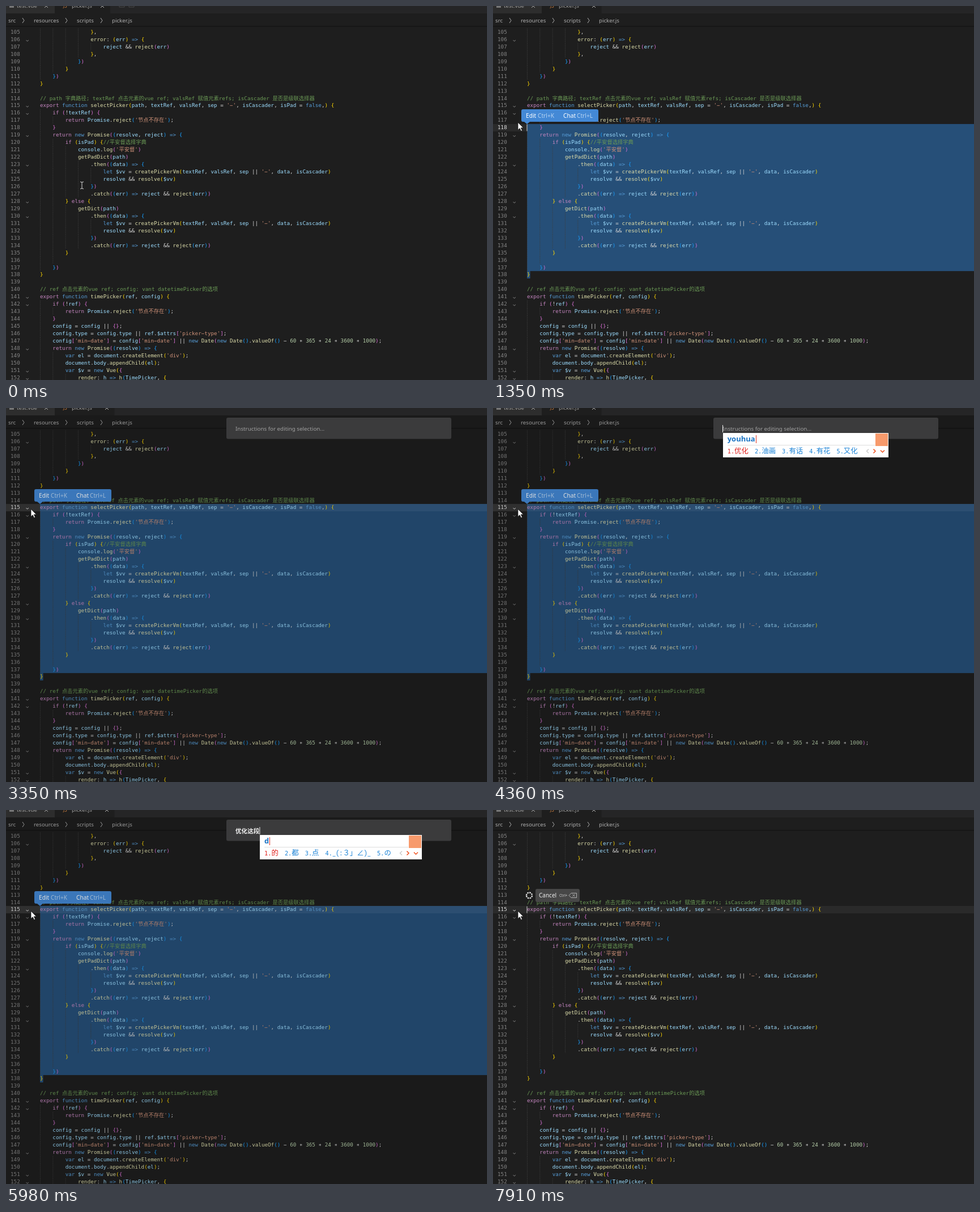
These frames come from a looping animation (849 px wide and 659 px high, 8 s). An HTML page:

```html
<!DOCTYPE html>
<html lang="zh-CN">
<head>
<meta charset="utf-8">
<title>Editor</title>
<style>
html, body { margin: 0; width: 849px; height: 659px; overflow: hidden; background: #1e1e1e; }
body { position: relative; }
svg { display: block; }
text { white-space: pre; }
.code { font: 9.27px "DejaVu Sans Mono", "Noto Sans CJK SC", monospace; }
.ui { font: 9.7px "Noto Sans", "Noto Sans CJK SC", sans-serif; }
#ime { position: absolute; top: 44px; height: 42.5px; box-sizing: border-box; padding: 0 54px 0 8px;
  background: #fff; white-space: nowrap; }
#pinyin { height: 21px; font: 600 13px/20px "Noto Sans", sans-serif; color: #1b74c4; }
#pinyin::after { content: ""; display: inline-block; width: 1px; height: 14px; margin-left: 1px;
  background: #e0301e; vertical-align: -3px; }
#cands { font: 12.4px/21px "Noto Sans Mono CJK SC", "Noto Sans CJK SC", sans-serif; color: #1a82d6; }
#cands span { margin-right: 11px; }
#cands span:first-child { color: #e0201c; }
#cands span:last-child { margin: 0; }
#cands i { font: 10.3px "DejaVu Sans Mono", monospace; }
#rule { position: absolute; left: 8px; right: 24px; top: 21px; height: 1px; background: #ddd; }
#badge { position: absolute; right: 1px; top: 1px; width: 22px; height: 22px; background: #f79a6c; }
#arrows { position: absolute; right: 0; top: 24px; }
</style>
</head>
<body>
<svg id="stage" width="849" height="659" viewBox="0 0 849 659">
  <rect width="849" height="659" fill="#1e1e1e"/>
  <rect id="rowGlow" width="849" height="13" fill="#2a2a2a"/>
  <g id="selection" fill="#264f78">
    <rect id="selMain" x="60" width="789"/>
    <rect id="selTail" x="60" width="5.6"/>
  </g>
  <g id="guides" stroke="#404040" stroke-width=".7" stroke-dasharray="2 1"></g>
  <g id="code" class="code"></g>
  <rect id="caret" width="1" height="12" fill="#d0d0d0"/>
  <rect y="35" width="849" height="1.5" fill="#151515"/>
  <rect width="849" height="13" fill="#252526"/>
  <rect width="86" height="13" fill="#2d2d2d"/>
  <rect id="tab" x="86" height="13" fill="#1e1e1e"/>
  <g class="ui" fill="#a0a0a0">
    <rect x="6" y="0" width="8" height="3" fill="#777"/>
    <text x="19" y="3">test.vue</text>
    <text x="101" y="3" fill="#d08040" font-size="8">JS</text>
    <text x="116" y="3">picker.js</text>
    <path d="M68 3L74-3M68-3L74 3" stroke="#aaa"/>
    <path id="tabClose" d="M-3 3L3-3M-3-3L3 3" stroke="#bbb"/>
    <path id="tabIcons" d="M200-4v6h9v-6M217-4v6h9v-6" fill="none" stroke="#484848"/>
  </g>
  <g class="ui" fill="#b0b0b0">
    <text x="4" y="28.5">src</text><text x="49" y="28.5">resources</text>
    <text x="125" y="28.5">scripts</text><text x="187" y="28.5">picker.js</text>
    <path d="M29 21l3 4.5-3 4.5M105 21l3 4.5-3 4.5M167 21l3 4.5-3 4.5" fill="none" stroke="#b0b0b0"/>
  </g>
  <g id="tip" class="ui">
    <path d="M53 0H183q3 0 3 3V19q0 3-3 3H65l-5 4-5-4H53q-3 0-3-3V3q0-3 3-3z" fill="#4489d6"/>
    <g font-size="10.2"><text x="58" y="15" fill="#fff" font-weight="500">Edit</text>
    <text x="79" y="15" fill="#b5d3f2">Ctrl+K</text>
    <text x="124" y="15" fill="#fff" font-weight="500">Chat</text>
    <text x="148" y="15" fill="#b5d3f2">Ctrl+L</text></g>
  </g>
  <g id="dim">
    <rect y="13" width="849" height="646" opacity=".13"/>
    <rect id="dimRow" width="849" height="13" fill="#fff" opacity=".05"/>
  </g>
  <g id="prompt" class="ui">
    <rect x="389" y="17" width="397" height="37.5" rx="3" fill="#3b3b3c"/>
    <text id="hint" x="405" y="40.3" font-size="9.8" fill="#a0a0a0">Instructions for editing selection...</text>
    <text id="typed" x="405" y="40.6" font-size="10.6" font-weight="700" fill="#f0f0f0"></text>
    <rect id="promptCaret" y="30" width="1" height="13" fill="#eee"/>
  </g>
  <g id="busy" class="ui">
    <circle id="spinner" cx="64" cy="150.5" r="5" fill="none" stroke="#ddd" stroke-width="2.4" stroke-dasharray="2.6 1.327"/>
    <rect x="75" y="139" width="78" height="23" rx="3" fill="#474747"/>
    <text x="81" y="154" font-size="10" fill="#eee">Cancel</text>
    <text x="117" y="153" font-size="6.5" fill="#ccc">Ctrl+</text>
    <path d="M134 150.500l4-4h9.500v8h-9.500zM140.500 148.500l4 4M144.500 148.500l-4 4" fill="none" stroke="#bbb" stroke-width=".9"/>
  </g>
  <path id="beam" d="M-3-6h2l1 1 1-1h2M0-5V5M-3 6h2l1-1 1 1h2" fill="none" stroke="#d8d8d8"/>
  <path id="arrow" d="M0 0V13.500L3.200 10.600 5.500 15.500 7.600 14.500 5.400 9.800H9.600z" fill="#fff" stroke="#111" stroke-width=".8"/>
</svg>
<div id="ime">
  <div id="pinyin"></div><div id="cands"></div><div id="rule"></div><div id="badge"></div>
  <svg id="arrows" width="44" height="18" fill="none" stroke-width="1.5">
    <path d="M9 4.500l-3.500 3.500 3.500 3.500" stroke="#ccc"/>
    <path d="M17.500 4.500l3.500 3.500-3.500 3.500" stroke="#f0501e"/>
    <path d="M30 6.500l3.500 3.500 3.500-3.500" stroke="#f0501e"/>
  </svg>
</div>
<script>
const SOURCE = `                },
                error: (err) => {
                    reject && reject(err)
                },
            })
        }
    })
}

// path 字典路径; textRef 点击元素的vue ref; valsRef 赋值元素refs; isCascader 是否是级联选择器
export function selectPicker(path, textRef, valsRef, sep = '-', isCascader, isPad = false,) {
    if (!textRef) {
        return Promise.reject('节点不存在');
    }
    return new Promise((resolve, reject) => {
        if (isPad) {//平安督选择字典
            console.log('平安督')
            getPadDict(path)
                .then((data) => {
                    let $vv = createPickerVm(textRef, valsRef, sep || '-', data, isCascader)
                    resolve && resolve($vv)
                })
                .catch((err) => reject && reject(err))
        } else {
            getDict(path)
                .then((data) => {
                    let $vv = createPickerVm(textRef, valsRef, sep || '-', data, isCascader)
                    resolve && resolve($vv)
                })
                .catch((err) => reject && reject(err))
        }

    })
}

// ref 点击元素的vue ref; config: vant datetimePicker的选项
export function timePicker(ref, config) {
    if (!ref) {
        return Promise.reject('节点不存在');
    }
    config = config || {};
    config.type = config.type || ref.$attrs['picker-type'];
    config['min-date'] = config['min-date'] || new Date(new Date().valueOf() - 60 * 365 * 24 * 3600 * 1000);
    return new Promise((resolve) => {
        var el = document.createElement('div');
        document.body.appendChild(el);
        var $v = new Vue({
            render: h => h(TimePicker, {`.split('\n');

const FIRST = 105, TOP = 39.5, ROW = 12.957, LEFT = 60, CHAR = 5.58, LOOP = 8000;
const $ = id => document.getElementById(id);
const rowTop = line => TOP + (line - FIRST) * ROW;
const show = (id, on) => { $(id).style.display = on ? '' : 'none'; };
const set = (id, attrs) => { for (const k in attrs) $(id).setAttribute(k, attrs[k]); };

function add(parent, tag, attrs, text = '') {
  const el = document.createElementNS('http://www.w3.org/2000/svg', tag);
  for (const k in attrs) el.setAttribute(k, attrs[k]);
  el.textContent = text;
  return parent.appendChild(el);
}

// Each alternative pairs with the colour at the same index.
const TOKEN = /(\/\/.*)|('[^']*')|(\b(?:export|return|if|else)\b)|(\b(?:function|new|let|var|false)\b|=>)|(\b\d+\b)|([\w$]+(?=\()|\b(?:error|render)(?=:))|([\w$]+)|([()[\]{}])|(\s+|.)/g;
const COLORS = ['#6a9955', '#ce9178', '#c586c0', '#569cd6', '#b5cea8', '#dcdcaa', '#9cdcfe', '', '#d4d4d4'];
const BRACKET_KIND = 7;
const BRACKETS = ['#ffd700', '#da70d6', '#179fff'];
// The editor face has a wide hyphen and a centred asterisk.
const glyphs = s => s.replace(/-/g, '−').replace(/\*/g, '∗');
const numbers = [], folds = [];

function buildCode() {
  let depth = 7, indent = 0;
  SOURCE.forEach((src, i) => {
    const line = FIRST + i, top = rowTop(line), y = Math.round(top + 9.4);
    numbers[line] = add($('code'), 'text', { x: 8, y, fill: '#858585' }, line);
    if (src.endsWith('{'))
      folds[line] = add($('code'), 'path', { d: `M35.500 ${y - 2}l2.200 2.200 2.200-2.200`, fill: 'none', stroke: '#8a8a8a' });
    indent = src ? src.search(/\S/) : indent;
    for (let c = 0; c < indent; c += 4) {
      const x = LEFT + .5 + c * CHAR;
      add($('guides'), 'line', { x1: x, x2: x, y1: top, y2: top + ROW });
    }
    const row = add($('code'), 'text', { x: LEFT, y });
    for (const m of src.matchAll(TOKEN)) {
      const kind = m.slice(1).findIndex(s => s !== undefined);
      let fill = COLORS[kind];
      if (kind === BRACKET_KIND) {
        const open = '([{'.includes(m[0]);
        if (!open) depth--;
        fill = BRACKETS[depth % 3];
        if (open) depth++;
      }
      add(row, 'tspan', { fill }, glyphs(m[0]));
    }
  });
}

// Pointer path: time, x, y
const POINTER = [[0, 134, 316], [90, 125, 340], [360, 82, 484], [540, 80, 480], [720, 66, 468],
  [810, 56, 440], [990, 49, 368], [1350, 44, 205], [1820, 44, 178]];
// Line the selection reaches
const CURSOR_LINE = [[540, 138], [720, 137], [810, 136], [900, 134], [990, 132], [1080, 128],
  [1170, 124], [1260, 120], [1350, 118], [1440, 117], [1620, 116], [1800, 115]];
// Prompt typing: time, committed text, pinyin, candidates
const TYPING = [[2810, '', ''],
  [3890, '', 'y', '一 有 要 也 以'], [3980, '', 'yo', '有 又 右 哟 由'], [4090, '', 'you', '有 又 由 右 油'],
  [4180, '', 'youhu', '优惠 有很多 又会 有好多 油耗'], [4360, '', 'youhua', '优化 油画 有话 有花 又化'],
  [4720, '优化', ''], [4990, '优化', 'z', '在 这 中 最 做'], [5170, '优化', 'zh', '这 中 最后 真 朱'],
  [5260, '优化', 'zhe', '这 着 者 折 哲'], [5350, '优化', 'zhed', '这段 这 着 者 折'],
  [5440, '优化', 'zhedu', '这度 这 着 者 折'], [5530, '优化', 'zhedua', '这段 这对 折断 这端 着的'],
  [5620, '优化', 'zheduan', '这段 这对 折断 这端 着的'], [5800, '优化这段', ''],
  [5980, '优化这段', 'd', '的 都 点 _(:３」∠)_ の'], [6180, '优化这段', 'da', '大 打 达 答 搭'],
  [6270, '优化这段', 'dai', '带 代 待 戴 呆'], [6360, '优化这段', 'daim', '代码 带吗 代名 带满 呆萌'],
  [6540, '优化这段', 'daima', '代码 带吗 大妈 打骂 待嘛'], [6990, '优化这段代码', '']];

const latest = (steps, t) => steps.filter(s => s[0] <= t).pop();

function pointerAt(t) {
  const q = Math.floor(t / 90) * 90;
  const i = POINTER.findIndex(p => p[0] > q);
  if (i < 0) return POINTER[POINTER.length - 1].slice(1);
  const [t0, x0, y0] = POINTER[i - 1], [t1, x1, y1] = POINTER[i];
  const k = (q - t0) / (t1 - t0);
  return [x0 + (x1 - x0) * k, y0 + (y1 - y0) * k];
}

let activeLine = 0;
function markLine(line) {
  if (line === activeLine) return;
  if (activeLine) numbers[activeLine].setAttribute('fill', '#858585');
  if (line) numbers[line].setAttribute('fill', '#e0e0e0');
  folds[115].setAttribute('stroke', line === 115 ? '#eee' : '#8a8a8a');
  activeLine = line;
}

let shown = null;
function renderTyping(step) {
  if (step === shown) return;
  shown = step;
  const [, text, pinyin, cands] = step || [0, '', ''];
  const x = 405 + text.length * 10.6;
  $('typed').textContent = text;
  show('hint', !text);
  show('ime', pinyin);
  set('promptCaret', { x });
  if (!pinyin) return;
  $('ime').style.left = x + .7 + 'px';
  $('pinyin').textContent = pinyin;
  $('cands').innerHTML = cands.split(' ').map((c, i) => `<span><i>${i + 1}.</i>${c}</span>`).join('');
}

function render(t) {
  const prompting = t >= 2810 && t < 7440, busy = t >= 7440;
  const line = (latest(CURSOR_LINE, t) || [0, 0])[1];
  const selecting = line > 0 && line < 138 && !busy;
  const top = rowTop(line);

  set('tab', { width: t < 180 ? 98 : 105.5 });
  set('tabClose', { transform: `translate(${t < 180 ? 170 : 178} 0)` });
  show('tabIcons', t < 180);

  markLine(line);
  show('rowGlow', line);
  show('selection', selecting);
  show('tip', selecting);
  if (line) {
    set('rowGlow', { y: top });
    set('dimRow', { y: top });
    set('caret', { x: line === 138 ? 65.5 : 59.5, y: top + .5 });
  }
  if (selecting) {
    set('selMain', { y: top, height: rowTop(138) - top });
    set('selTail', { y: rowTop(138), height: ROW });
    set('tip', { transform: `translate(0 ${top - 26})` });
  }
  show('caret', line && (t < 2270 || busy));

  show('dim', prompting);
  show('prompt', prompting);
  renderTyping(prompting ? latest(TYPING, t) : null);
  show('promptCaret', t < 3350 || t >= 3890);

  show('busy', busy);
  set('spinner', { transform: `rotate(${Math.floor((t - 7440) / 90) * 36} 64 150.5)` });

  const [px, py] = pointerAt(t), inGutter = px < 60;
  show('beam', !inGutter);
  show('arrow', inGutter);
  set(inGutter ? 'arrow' : 'beam', { transform: `translate(${px} ${py})` });
}

buildCode();
show('ime', false);
const start = performance.now();
(function frame() {
  render((performance.now() - start) % LOOP);
  requestAnimationFrame(frame);
})();
</script>
</body>
</html>
```
